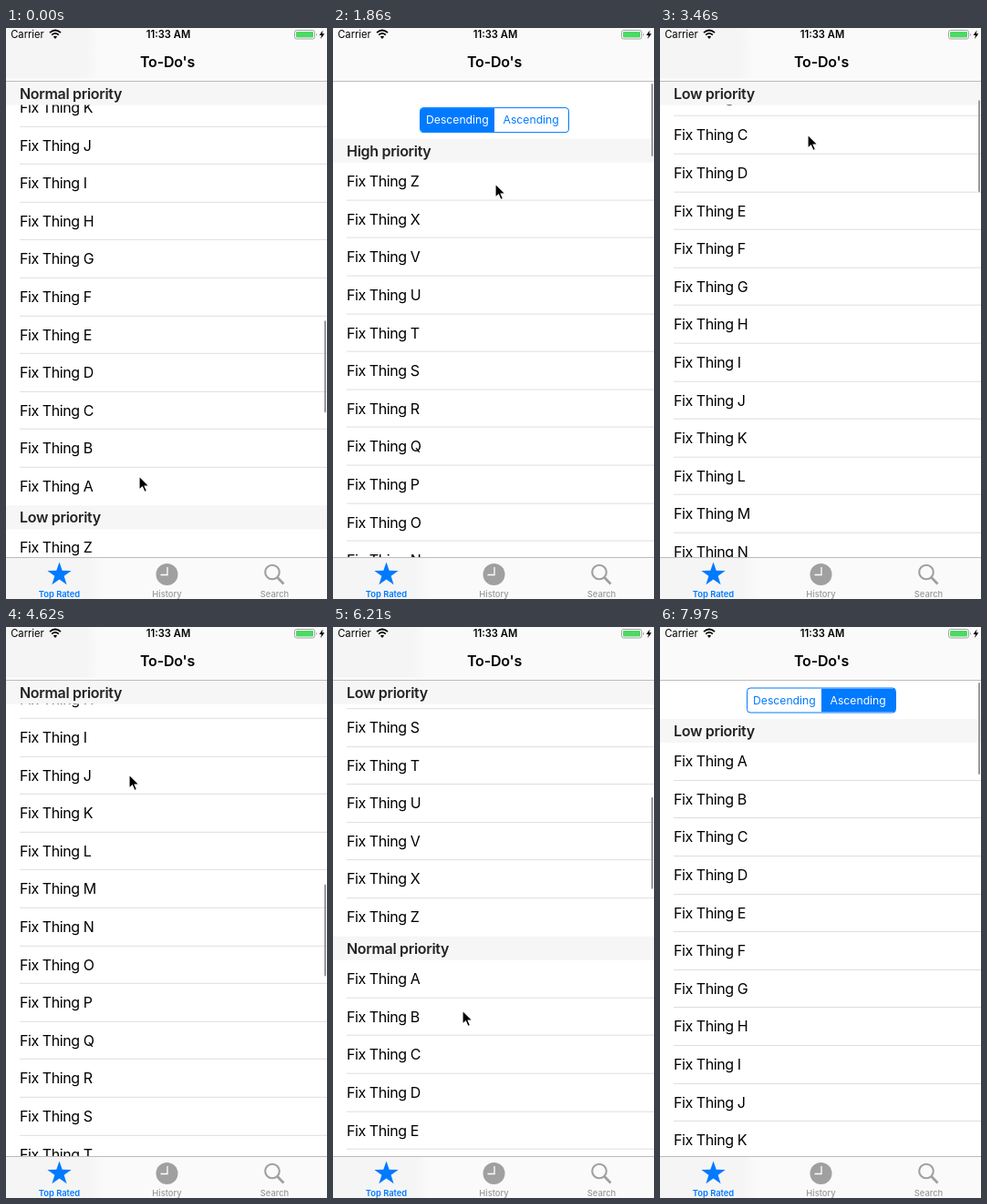
An HTML page for the animation above (8 s loop, 352 px wide and 627 px high).

```html
<!DOCTYPE html>
<html lang="en">
<head>
<meta charset="utf-8">
<style>
  html, body { margin: 0; width: 100%; height: 100%; overflow: hidden; background: #fff; }
  body { font: 16px Inter, "Liberation Sans", sans-serif; color: #000; }
  #stage { position: absolute; left: 0; top: 0; width: 352px; height: 627px; overflow: hidden; background: #fff; }
  .section, .head, .row, #segments, #bar { position: absolute; left: 0; }
  .section { top: 0; width: 352px; }
  .head { top: 0; z-index: 1; width: 337px; height: 26.2px; line-height: 26.2px; padding-left: 15px;
    background: #f6f6f6; font-weight: 600; letter-spacing: -.3px; color: #222; }
  .row { left: 15px; width: 337px; height: 41.6px; line-height: 41.6px; letter-spacing: -.42px; }
  .row:not(:last-child)::after { content: ""; position: absolute; left: 0; right: 0; bottom: 0; height: 1px; background: #dedede; }
  #segments { left: 95px; top: 0; width: 161.5px; height: 25.5px; border: 1px solid #007aff; border-radius: 4px;
    overflow: hidden; display: flex; font-size: 12.2px; line-height: 25.5px; text-align: center; color: #007aff; }
  #segments span { flex: 1; }
  #segments .on { background: #007aff; color: #fff; }
  #segments .pressed { background: #d9ebff; }
  #bar { left: 348.5px; top: 0; width: 2.5px; border-radius: 2px; background: #999; z-index: 2; }
  svg { position: absolute; left: 0; top: 0; z-index: 3; }
  text { text-anchor: middle; }
</style>
</head>
<body>
<div id="stage">
  <div id="segments"><span>Descending</span><span>Ascending</span></div>
  <div id="bar"></div>
  <svg width="352" height="627" viewBox="0 0 352 627">
    <defs>
      <linearGradient id="tint">
        <stop offset=".85" stop-color="#f5f5f5"/><stop offset="1" stop-color="#f5f5f5" stop-opacity="0"/>
      </linearGradient>
    </defs>
    <rect width="352" height="58" fill="#fafafa"/>
    <rect id="navTint" width="102" height="55" fill="url(#tint)"/>
    <rect y="58" width="352" height="1" fill="#bcbcbc"/>
    <rect y="581" width="352" height="46" fill="#fafafa"/>
    <rect y="582" width="106" height="45" fill="url(#tint)"/>
    <rect y="581" width="352" height="1" fill="#bcbcbc"/>

    <text x="23.5" y="11.2" font-size="11.2">Carrier</text>
    <g fill="none" stroke="#000" stroke-width="1.8">
      <path d="M48 5.2Q54 -.2 60 5.2M50.2 7.6Q54 4.2 57.8 7.6"/>
      <path d="M54 12L51.9 9.6Q54 8 56.1 9.6Z" fill="#000" stroke="none"/>
    </g>
    <text x="178" y="11.2" font-size="11.2" font-weight="600">11:33 AM</text>
    <rect x="316.5" y="2.5" width="22" height="9.5" rx="2.2" fill="#fff" stroke="#999" stroke-width=".9"/>
    <rect x="318" y="4" width="19" height="6.5" rx="1" fill="#4cd964"/>
    <path d="M340 5.5Q341.8 7.2 340 9Z" fill="#888"/>
    <path d="M347.5 2.5L343.5 8H346L345 12L349.3 6.3H346.7Z"/>
    <text x="177" y="42.8" font-size="16" font-weight="600" letter-spacing="-.2">To-Do's</text>

    <path id="star" fill="#007aff"/>
    <circle cx="176.5" cy="600" r="12" fill="#a0a0a0"/>
    <path d="M177 592V600.5H169.5" fill="none" stroke="#fff" stroke-width="1.3"/>
    <g fill="none" stroke="#a0a0a0" stroke-width="2.1">
      <circle cx="292" cy="597.5" r="7.8"/><path d="M297.5 603.3L304.5 610.5" stroke-width="2.8"/>
    </g>
    <g font-size="9.4" font-weight="500" fill="#999">
      <text x="58.5" y="624.6" fill="#007aff" font-weight="600">Top Rated</text>
      <text x="176.5" y="624.6">History</text>
      <text x="294.5" y="624.6">Search</text>
    </g>
    <path id="cursor" d="M0 0V15.2L3.5 12L6 17.5L8.6 16.4L6.2 11H11Z" stroke="#fff" stroke-width="1.2"/>
  </svg>
</div>
<script>
const LOOP = 8000, FRAME = 88.85, TOGGLE = 2840, PRESS = 2750;
const ROW = 41.6, HEAD = 26.2, NAV = 58.5, FIRST = 101;
const letters = [..."ABCDEFGHIJKLMNOPQRSTUVXZ"];
const SECTION = HEAD + letters.length * ROW;
const priorities = ["Low priority", "Normal priority", "High priority"];

// [time, value] keys
const scrollKeys = [[-300, 1960], [0, 1625.8], [790, 744.9], [1420, 20], [1600, -62], [1860, -20.6], [2150, 0],
  [3100, 0], [3460, 113.3], [4620, 1383.8], [5100, 1680], [5580, 1440], [6210, 785.9], [6980, 15], [7180, -55], [7480, -12], [7800, 0]];
const cursorX = [[0, 146], [790, 139], [1450, 145], [1860, 178], [2570, 215], [3100, 215], [3290, 174], [3460, 162],
  [4620, 135], [5500, 138], [6210, 142], [7280, 160], [7970, 365]];
const cursorY = [[0, 492], [790, 461], [1450, 430], [1860, 171], [2570, 80], [3100, 80], [3290, 230], [3460, 117],
  [3950, 320], [4250, 165], [4620, 162], [5100, 190], [5600, 440], [6210, 421], [7280, 460], [7970, 480]];

const $ = id => document.getElementById(id);
const clamp = (v, lo, hi) => Math.max(lo, Math.min(hi, v));

// Monotone cubic interpolation through the keys
function sample(keys, t) {
  const last = keys.length - 1;
  if (t <= keys[0][0]) return keys[0][1];
  if (t >= keys[last][0]) return keys[last][1];
  const slope = i => (keys[i + 1][1] - keys[i][1]) / (keys[i + 1][0] - keys[i][0]);
  const tangent = i => {
    if (i === 0 || i === last) return slope(Math.min(i, last - 1));
    const a = slope(i - 1), b = slope(i);
    return a * b <= 0 ? 0 : 2 * a * b / (a + b);
  };
  const i = keys.findIndex(k => k[0] > t) - 1;
  const [t0, v0] = keys[i], [t1, v1] = keys[i + 1];
  const d = t1 - t0, u = (t - t0) / d, w = 1 - u;
  return v0 * w * w * (1 + 2 * u) + v1 * u * u * (3 - 2 * u)
    + d * u * w * (tangent(i) * w - tangent(i + 1) * u);
}

function add(parent, className) {
  const el = document.createElement("div");
  el.className = className;
  return parent.appendChild(el);
}

const sections = priorities.map(() => {
  const el = add($("stage"), "section");
  const head = add(el, "head");
  const rows = letters.map((_, i) => {
    const row = add(el, "row");
    row.style.top = HEAD + i * ROW + "px";
    return row;
  });
  return { el, head, rows };
});

$("star").setAttribute("d", "M" + Array.from({ length: 10 }, (_, i) => {
  const r = i % 2 ? 5.4 : 13.8, a = i * Math.PI / 5;
  return `${58.5 + r * Math.sin(a)} ${600.2 - r * Math.cos(a)}`;
}).join("L") + "Z");

let order = null;
function setOrder(ascending) {
  if (order === ascending) return;
  order = ascending;
  const sorted = list => ascending ? list : [...list].reverse();
  sections.forEach(({ head, rows }, i) => {
    head.textContent = sorted(priorities)[i];
    rows.forEach((row, j) => row.textContent = "Fix Thing " + sorted(letters)[j]);
  });
}

const moveY = (el, y) => el.style.transform = `translateY(${y}px)`;

function draw(t) {
  const scroll = sample(scrollKeys, t), ascending = t >= TOGGLE;
  setOrder(ascending);
  sections.forEach(({ el, head }, i) => {
    const top = FIRST - scroll + i * SECTION;
    moveY(el, top);
    moveY(head, clamp(NAV - top, 0, SECTION - HEAD));
  });

  const [descendingTab, ascendingTab] = $("segments").children;
  moveY($("segments"), 66.5 - scroll);
  descendingTab.className = ascending ? "" : "on";
  ascendingTab.className = ascending ? "on" : t >= PRESS ? "pressed" : "";

  moveY($("bar"), 61 + Math.max(scroll, 0) * .16);
  $("bar").style.height = 101 + Math.min(scroll, 0) + "px";
  $("bar").style.opacity = t >= 3100 ? 1 : clamp((2570 - t) / 270, 0, 1);

  $("navTint").setAttribute("opacity", clamp((scroll - 30) / 40, 0, 1));
  $("cursor").setAttribute("transform", `translate(${sample(cursorX, t)} ${sample(cursorY, t)})`);
}

function stepTime(t) {
  if (t >= 7970) return 7970;
  const n = Math.floor((Math.floor(t / 10) * 10 + 9.99) / FRAME);
  return Math.floor(n * FRAME / 10) * 10;
}

const start = performance.now();
function tick() {
  draw(stepTime((performance.now() - start) % LOOP));
  requestAnimationFrame(tick);
}
tick();
</script>
</body>
</html>
```
